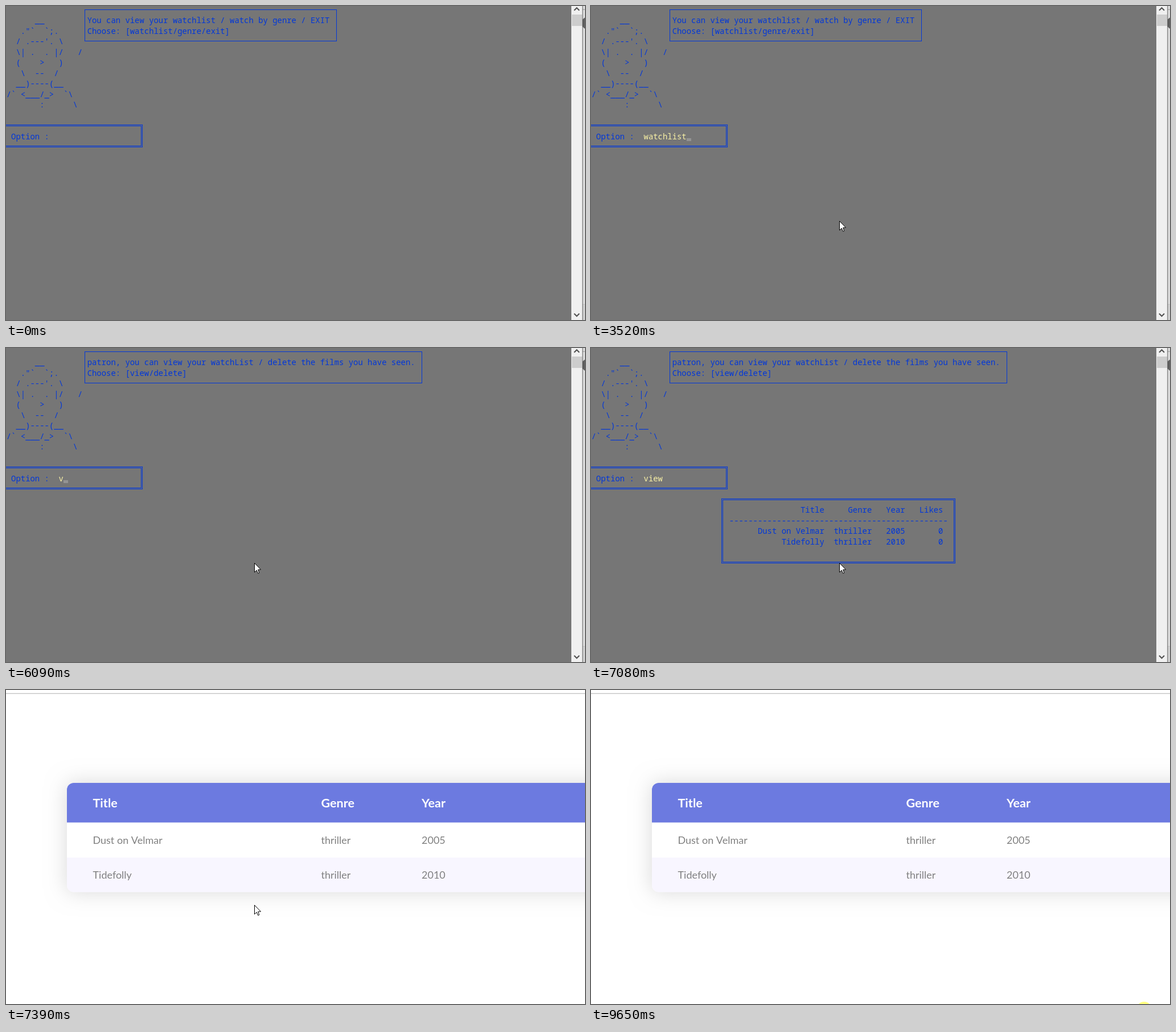
Animation of 1017 by 551 pixels, one loop 9740 ms. Source, as an HTML page with a canvas:

```html
<!DOCTYPE html>
<html lang="en">
<head>
<meta charset="utf-8">
<title>Watchlist terminal</title>
<style>
html, body { margin: 0; width: 100%; height: 100%; overflow: hidden; background: #fff; }
canvas { display: block; }
</style>
</head>
<body>
<canvas id="stage" width="1017" height="551"></canvas>
<script>
const ctx = document.getElementById('stage').getContext('2d');
const W = 1017, H = 551, LOOP = 9740;
const CELL = 8.347, ROW = 18.5, LEFT = 0.75;
const BLUE = '#0037da', YELLOW = '#f9f1a5';
const MONO = '13.912px "Noto Sans Mono", monospace';
const ARIAL = '"Liberation Sans", Arial, sans-serif';
const LATO = 'Lato, sans-serif';

const PORTRAIT = [
  '      __',
  '   ."`  `;.',
  "  / .---'. \\",
  '  \\| .  . |/   /',
  '  (    >   )',
  '   \\  --  /',
  '  __)----(__',
  '/` <___/_>  `\\',
  '       :      \\'
];
const MENU = ['You can view your watchlist / watch by genre / EXIT', 'Choose: [watchlist/genre/exit]'];
const SUBMENU = ['patron, you can view your watchList / delete the films you have seen.', 'Choose: [view/delete]'];
const FILMS = [['Dust on Velmar', 'thriller', '2005'], ['Tidefolly', 'thriller', '2010']];

// [time, typed text, caret visible]
const INPUT = [
  [0, '', 0], [890, '', 1], [1270, 'w', 1], [1430, 'wa', 0], [1580, 'wat', 1],
  [1730, 'watc', 1], [1900, 'watch', 1], [1980, 'watch', 0], [2360, 'watchl', 1],
  [2510, 'watchli', 1], [2590, 'watchlis', 1], [2740, 'watchlist', 1],
  [2990, 'watchlist', 0], [3520, 'watchlist', 1], [3750, 'watchlist', 0],
  [5400, '', 1], [5630, '', 0], [6090, 'v', 1], [6160, 'v', 0], [6230, 'vi', 1],
  [6400, 'vie', 1], [6480, 'view', 1], [6710, 'view', 0]
];

function rect(color, x, y, w, h) {
  ctx.fillStyle = color;
  ctx.fillRect(x, y, w, h);
}

function disc(color, x, y, r) {
  ctx.fillStyle = color;
  ctx.beginPath();
  ctx.arc(x, y, r, 0, Math.PI * 2);
  ctx.fill();
}

function path(points, close) {
  ctx.beginPath();
  points.forEach(([x, y]) => ctx.lineTo(x, y));
  if (close) ctx.closePath();
}

function label(text, x, y, font, color, align = 'left') {
  ctx.font = font;
  ctx.fillStyle = color;
  ctx.textAlign = align;
  ctx.fillText(text, x, y);
}

function cells(text, col, row, color = BLUE) {
  [...text].forEach((ch, i) => {
    if (ch !== ' ') label(ch, (col + i) * CELL + LEFT, 11.5 + row * ROW, MONO, color);
  });
}

function caret(col, row) {
  rect('#949494', Math.round(col * CELL + LEFT), 10 + row * ROW, 8, 5);
}

function frame(x1, y1, x2, y2) {
  ctx.strokeStyle = BLUE;
  ctx.lineWidth = 1;
  ctx.strokeRect(x1, y1, x2 - x1, y2 - y1);
}

function doubleFrame(x1, y1, x2, y2) {
  frame(x1, y1, x2, y2);
  frame(x1 + 2, y1 + 2, x2 - 2, y2 - 2);
}

function chevron(y, dir) {
  ctx.strokeStyle = '#505050';
  ctx.lineWidth = 2;
  path([[998, y + 2.3 * dir], [1002.5, y - 2.3 * dir], [1007, y + 2.3 * dir]]);
  ctx.stroke();
}

function toolbarEdge() {
  rect('#fff', 0, 0, W, H);
  rect('#c8c8c8', 0, 5.5, W, 1.5);
}

function keyboardIcon() {
  rect('#757575', 757, 380, 23, 14);
  for (let i = 0; i < 7; i++) {
    rect('#ddd', 759 + i * 2.9, 382.5, 1.5, 1.5);
    rect('#ddd', 759 + i * 2.9, 386, 1.5, 1.5);
  }
  rect('#ddd', 763, 390, 11, 1.5);
}

function microphoneIcon() {
  ctx.lineCap = 'round';
  ctx.lineWidth = 7;
  ctx.strokeStyle = '#4285f4';
  path([[815, 379.5], [815, 387]]);
  ctx.stroke();
  ctx.lineCap = 'butt';
  ctx.lineWidth = 2;
  const arc = (color, from, to) => {
    ctx.strokeStyle = color;
    ctx.beginPath();
    ctx.arc(815, 387, 7, from * Math.PI, to * Math.PI);
    ctx.stroke();
  };
  arc('#ea4335', 0, 0.72);
  arc('#fbbc05', 0.72, 1);
  rect('#34a853', 814, 395, 2, 4);
}

function button(text, x, w) {
  rect('#f2f2f2', x, 449, w, 41.5);
  label(text, x + w / 2, 475, 'bold 15.3px ' + ARIAL, '#757575', 'center');
}

function searchBox() {
  ctx.save();
  ctx.shadowColor = 'rgba(0,0,0,.2)';
  ctx.shadowBlur = 2;
  ctx.shadowOffsetY = 2;
  ctx.fillStyle = '#fff';
  ctx.beginPath();
  ctx.roundRect(287, 361, 561, 51, 2);
  ctx.fill();
  ctx.restore();
  ctx.strokeStyle = 'rgba(0,0,0,.08)';
  ctx.lineWidth = 1;
  ctx.beginPath();
  ctx.roundRect(286.5, 360.5, 562, 52, 2);
  ctx.stroke();
}

function searchPage() {
  toolbarEdge();
  rect('#888', 996, 0, 11, 1);
  label('Zpost', 871, 36, '15.6px ' + ARIAL, '#404040', 'right');
  label('Imagini', 886.6, 36, '15.6px ' + ARIAL, '#404040');
  for (let i = 0; i < 9; i++) rect('#757575', 962 + i % 3 * 7, 21 + Math.floor(i / 3) * 7, 5, 5);
  disc('#707070', 1022, 30, 11);
  disc('#4285f4', 559.5, 276, 52);

  searchBox();
  keyboardIcon();
  microphoneIcon();

  button('Căutare Velqua', 406.5, 152);
  button('Mă simt norocos', 571.5, 159.5);
  rect('#f2f2f2', 0, 523, W, 28);
  rect('#e2e2e2', 0, 523, W, 1);
  label('România', 26.6, 554, '18px ' + ARIAL, '#757575');
}

function tablePage() {
  const x = 107, y = 163, w = 1100, h = 191.5;
  ctx.save();
  ctx.shadowColor = 'rgba(0,0,0,.15)';
  ctx.shadowBlur = 36;
  ctx.fillStyle = '#fff';
  ctx.beginPath();
  ctx.roundRect(x, y, w, h, 12);
  ctx.fill();
  ctx.shadowColor = 'transparent';
  ctx.clip();
  rect('#6c7ae0', x, y, w, 69.5);
  rect('#f8f6ff', x, 294, w, 61);
  ctx.restore();
  const columns = [152.5, 553.5, 730];
  ['Title', 'Genre', 'Year'].forEach((s, i) =>
    label(s, columns[i], 205.5, 'bold 21.6px ' + LATO, '#fff'));
  FILMS.forEach((film, r) => film.forEach((s, i) =>
    label(s, columns[i], 269.5 + r * 61, '18px ' + LATO, '#808080')));
}

function windowEdge() {
  rect('#f0f0f0', 993, 0, 19, H);
  rect('#cdcdcd', 994, 15, 18, 20);
  chevron(5.5, 1);
  chevron(542, -1);
  rect('#7c7c7c', 1012, 0, 1, H);
  const shade = ctx.createLinearGradient(1013, 0, 1017, 0);
  shade.addColorStop(0, 'rgba(0,0,0,.22)');
  shade.addColorStop(1, 'rgba(0,0,0,.1)');
  rect(shade, 1013, 0, 4, H);
}

// Screen refreshes in coarse steps while the message is printed.
function printedCount(t) {
  const [start, step] = t < 4760 ? [3750, 78.3] : [4760, 80];
  const shown = start + Math.floor((t - start) / step) * step;
  return Math.max(0, Math.floor((shown - 3855) / 15.6 + 0.05));
}

function message(t) {
  if (t < 3750) {
    frame(138.5, 6.5, 580.5, 61.5);
    MENU.forEach((s, i) => cells(s, 17, 1 + i));
    return;
  }
  frame(138.5, 6.5, 730.5, 61.5);
  const n = printedCount(t), first = SUBMENU[0].length, total = first + SUBMENU[1].length;
  cells(SUBMENU[0].slice(0, n), 17, 1);
  cells(SUBMENU[1].slice(0, Math.max(0, n - first)), 17, 2);
  if (n < total) caret(17 + (n < first ? n : n - first), n < first ? 1 : 2);
}

function filmTable() {
  doubleFrame(229.5, 264.5, 639.5, 377.5);
  const row = (values, y) =>
    values.forEach((s, i) => cells(s, [49, 59, 66, 74][i] - s.length, y));
  row(['Title', 'Genre', 'Year', 'Likes'], 15);
  cells('-'.repeat(46), 29, 16);
  FILMS.forEach((film, i) => row([...film, '0'], 17 + i));
}

function terminal(t) {
  searchPage();
  rect('#767676', 0, 0, 993, H);
  windowEdge();
  PORTRAIT.forEach((s, i) => cells(s, 0, 1 + i));
  message(t);
  doubleFrame(-5.5, 208.5, 239.5, 247.5);
  cells('Option :', 1, 12);
  const [, typed, blink] = INPUT.findLast(([at]) => at <= t);
  cells(typed, 11, 12, YELLOW);
  if (blink) caret(11 + typed.length, 12);
  if (t >= 6860) filmTable();
}

const mix = (a, b, p) => a + (b - a) * p;

function pointerAt(t) {
  if (t < 120) return [971, 560];
  if (t < 1730) {
    const p = Math.min(1, (Math.floor((t - 120) / 80) + 1) / 4);
    const e = 1 - (1 - p) ** 2;
    return [mix(971, 438, e), mix(560, 377, e)];
  }
  if (t < 8470) return [436, 377];
  const p = Math.min(1, (Math.floor((t - 8470) / 78.3) + 1) / 13);
  const e = p * p * (3 - 2 * p);
  return [mix(436, 946, e), mix(377, 552, e)];
}

function pointer(t) {
  const [x, y] = pointerAt(t).map(Math.round);
  if (t >= 360 && t < 440) disc('rgba(255,255,0,.5)', x, y, 13.5);
  if (t >= 9650) disc('rgba(255,255,0,.5)', 971.5, 560.5, 13.5);
  path([[0, 0], [0, 16], [3.7, 12.5], [6.2, 18], [8.3, 17.2], [6.2, 11.5], [11, 11.3]]
    .map(([dx, dy]) => [x + 0.5 + dx, y + 0.5 + dy]), true);
  ctx.lineJoin = 'round';
  ctx.fillStyle = '#fff';
  ctx.fill();
  ctx.strokeStyle = '#000';
  ctx.lineWidth = 1;
  ctx.stroke();
  ctx.lineJoin = 'miter';
}

function draw(t) {
  if (t < 7160) terminal(t);
  else if (t < 7230) searchPage();
  else {
    toolbarEdge();
    if (t >= 7390) tablePage();
  }
  pointer(t);
}

const began = performance.now();
function tick() {
  draw((performance.now() - began) % LOOP);
  requestAnimationFrame(tick);
}
tick();
</script>
</body>
</html>
```
